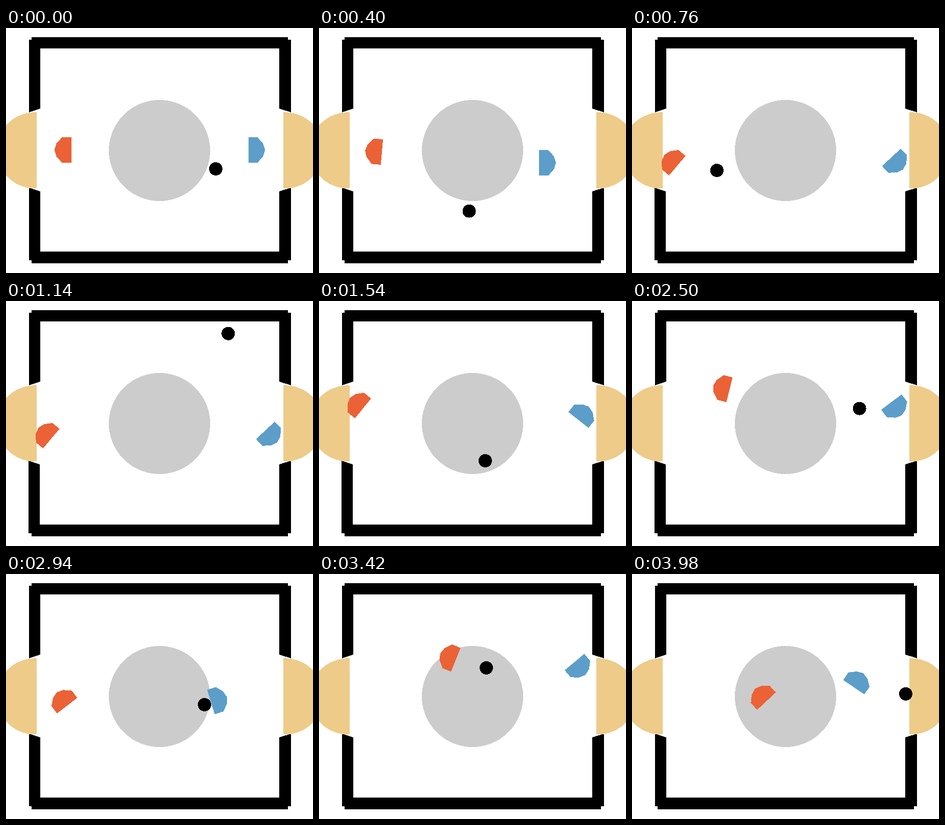
These frames come from a looping animation (600 px wide and 480 px high, 4000 ms). An HTML page:

```html
<!DOCTYPE html>
<html lang="en">
<head>
<meta charset="utf-8">
<title>Table hockey</title>
<style>
  html, body { margin: 0; width: 100%; height: 100%; overflow: hidden; background: #fff; }
  svg { display: block; width: 600px; height: 480px; }
</style>
</head>
<body>
<svg viewBox="0 0 600 480" shape-rendering="crispEdges">
  <circle cx="300" cy="240" r="99" fill="#ccc"/>
  <path d="M50 18H551V40H50ZM50 438H551V461H50Z"/>
  <path d="M45 23H67V158L45 165Z"/>
  <path d="M557 23H534V158L557 165ZM557 455H534V320L557 313Z"/>
  <path id="looseWall" d="M45 455H67V320L45 313Z"/>
  <g fill="#eecb89">
    <path d="M60 165.4A74.5 74.5 0 1 0 60 314.2Z"/>
    <path d="M542 165.4A74.5 74.5 0 1 1 542 314.2Z"/>
  </g>
  <path id="red" fill="#eb6236"/>
  <path id="blue" fill="#5c9ec9"/>
  <circle id="puck" r="13"/>
</svg>
<script>
const LOOP = 4000, STEP = 20;
const COURT = { left: 80, right: 521, top: 53, bottom: 425 };
const BAT_SPEED = 0.36;
const BAT = "M15-25V25H-3L-14 12.5L-18 0L-14-12.5L-3-25Z";
const RED_HOME = [112.5, 239, 0], BLUE_HOME = [488.5, 239, 180];

// A shot is [time, x, y, vx, vy] in px and ms; the last one of a round scores.
// A stop is [arrival time, x, y, angle].
const rounds = [
  {
    start: 0,
    shots: [
      [0, 410, 276, 0, 0], [260, 410, 276, -0.832, 0.59], [760, 166, 279, 0.706, -0.623],
      [1540, 325, 313, -0.678, 0.667], [2080, 201, 177, 0.58, 0.08]
    ],
    red: [[500, 77, 260, 40], [1540, 74.4, 201, 39], [2080, 176, 170.3, 14]],
    blue: [[260, 423, 264, 165], [600, 517.2, 264.4, 227], [1540, 516.3, 221.3, 128.5], [2080, 516, 210, 233]]
  },
  {
    start: 2700,
    shots: [
      [2700, 406, 252, 0, 0], [2920, 406, 252, -0.9, 0.2],
      [3100, 244, 288, 0.14, -0.38], [3400, 297, 176, 1.5, 0.39]
    ],
    red: [[2940, 110.4, 246, 52.6], [3420, 253.5, 162.4, 22]],
    blue: [[2940, 414.8, 246.4, 163], [3420, 509, 184, 230]]
  },
  {
    start: 3580,
    shots: [[3580, 230, 182, 0, 0], [3820, 230, 182, 1.906, 0.33]],
    red: [[3980, 252.7, 238, 47]],
    blue: [[3980, 441.9, 209.4, 124]]
  }
];

const byId = id => document.getElementById(id);
const [red, blue, puck, looseWall] = ["red", "blue", "puck", "looseWall"].map(byId);
red.setAttribute("d", BAT);
blue.setAttribute("d", BAT);

// Bounces a straight path back and forth between two walls.
function bounce(value, low, high) {
  const span = high - low;
  const turn = (((value - low) % (2 * span)) + 2 * span) % (2 * span);
  return low + (turn > span ? 2 * span - turn : turn);
}

function puckAt(shots, time) {
  const shot = shots.findLast(([at]) => at <= time);
  const [at, x0, y0, vx, vy] = shot;
  const x = x0 + vx * (time - at), y = y0 + vy * (time - at);
  if (shot === shots.at(-1)) return [x, y];
  return [bounce(x, COURT.left, COURT.right), bounce(y, COURT.top, COURT.bottom)];
}

// A bat waits, then leaves just early enough to reach its next stop in time.
function batAt(home, stops, time) {
  let from = home;
  for (const [arrival, ...to] of stops) {
    if (time < arrival) {
      const travel = Math.hypot(to[0] - from[0], to[1] - from[1]) / BAT_SPEED;
      const part = Math.max(0, 1 - (arrival - time) / travel);
      return from.map((value, i) => value + (to[i] - value) * part);
    }
    from = to;
  }
  return from;
}

function place(node, [x, y, angle = 0]) {
  node.setAttribute("transform", `translate(${x} ${y}) rotate(${angle})`);
}

function draw(time) {
  const round = rounds.findLast(({ start }) => start <= time);
  place(red, batAt(RED_HOME, round.red, time));
  place(blue, batAt(BLUE_HOME, round.blue, time));
  place(puck, puckAt(round.shots, time));
  // The lower left wall gives way a little when the puck strikes it.
  place(looseWall, [round === rounds[0] && time >= 660 ? -1 : 0, 0]);
}

let start;
function tick(now) {
  start ??= now;
  draw(Math.floor((now - start) % LOOP / STEP) * STEP);
  requestAnimationFrame(tick);
}
draw(0);
requestAnimationFrame(tick);
</script>
</body>
</html>
```
